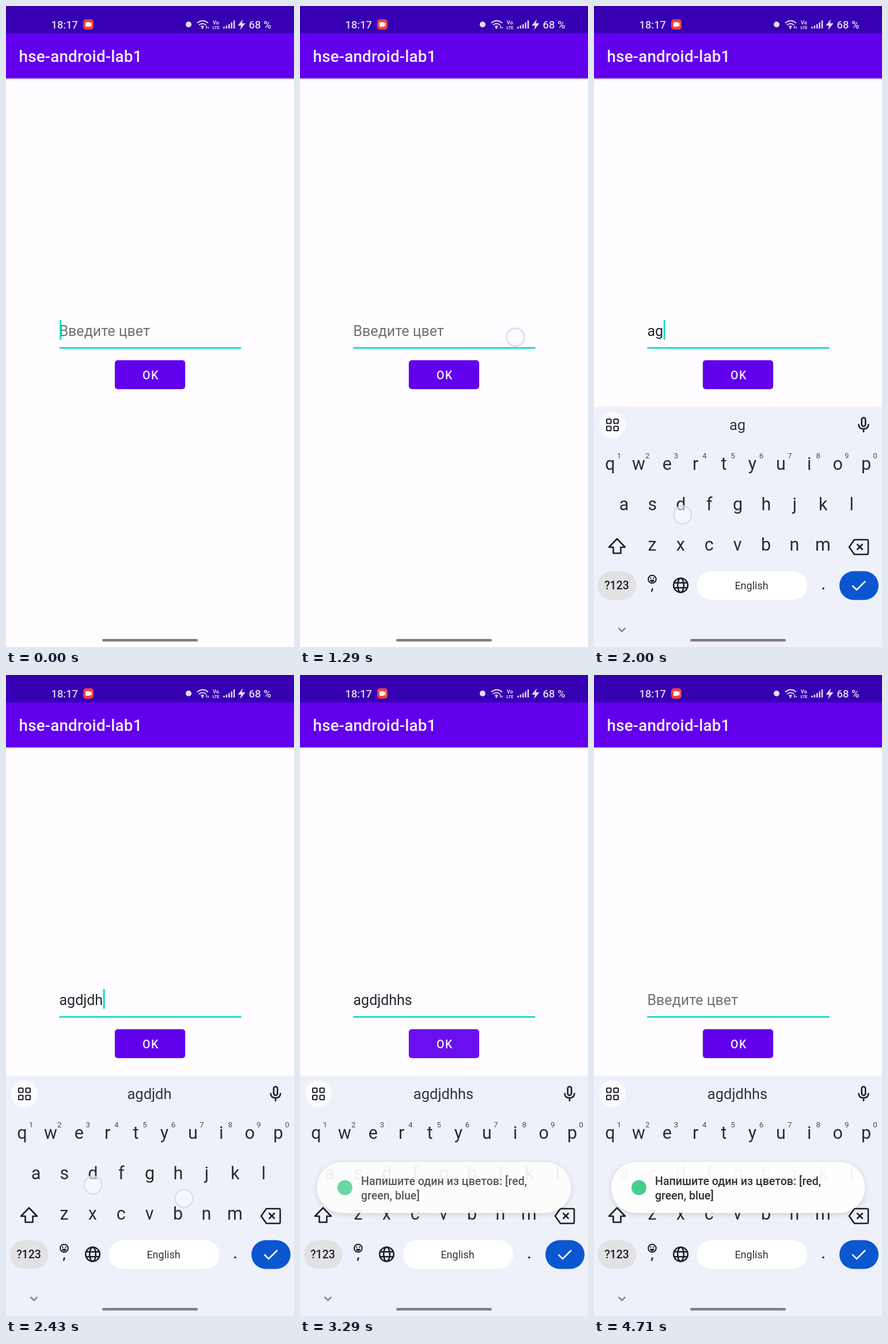
Animation of 500x1111 px, one loop 5.01 s. Source, as an HTML page:

```html
<!DOCTYPE html>
<html lang="ru">
<head>
<meta charset="utf-8">
<title>hse-android-lab1</title>
<style>
  html, body { margin: 0; width: 100%; height: 100%; overflow: hidden; background: #fffdff; }
  svg { display: block; width: 100%; height: 100%; font-family: Roboto, sans-serif; }
  .medium { font-weight: 500; }
  .mid { text-anchor: middle; }
  .line { fill: none; stroke: #1d1f24; stroke-width: 2.6; }
  .thin { stroke-width: 2.1; }
  .status { fill: #e3dbf5; }
  #toast { filter: drop-shadow(0 2px 5px #00000026); }
  #button { filter: drop-shadow(0 .5px 1px #00000030); }
  #touches circle { fill: #f8f8ff; fill-opacity: .6; stroke: #d8d6e8; stroke-width: 2; }
</style>
</head>
<body>
<svg viewBox="0 0 500 1111">
  <defs>
    <linearGradient id="shade" x2="0" y2="1">
      <stop stop-color="#000" stop-opacity=".14"/>
      <stop offset="1" stop-color="#000" stop-opacity="0"/>
    </linearGradient>
  </defs>

  <rect width="500" height="1111" fill="#fffdff"/>
  <rect y="125" width="500" height="4" fill="url(#shade)"/>
  <rect width="500" height="125.5" fill="#6200ee"/>
  <rect width="500" height="47.5" fill="#3700b3"/>
  <text class="medium" x="22.500" y="97" font-size="27.800" letter-spacing=".21" fill="#f6f0ff">hse-android-lab1</text>

  <!-- status bar -->
  <g class="status">
    <text class="medium" x="78.500" y="39" font-size="18.300">18:17</text>
    <rect x="134" y="23" width="18" height="18" rx="5" fill="#f0403f"/>
    <path d="M139.500 28h5q1.500 0 1.500 1.500l2.500-1v7l-2.500-1q0 1.500-1.500 1.500h-5q-1.500 0-1.500-1.500v-5q0-1.500 1.500-1.500z" fill="#fff"/>
    <circle cx="317" cy="32" r="5"/>
    <path d="M332 29.500q9.500-8 19 0M335 33q6-5 12.500 0M338.500 36q2.500-2 5 0" fill="none" stroke="#e3dbf5" stroke-width="2"/>
    <circle cx="341" cy="38" r="1.700"/>
    <path d="M348 34v5M351 36v3" stroke="#e3dbf5" stroke-width="1.500"/>
    <g class="mid" font-weight="700">
      <text x="364.500" y="31.500" font-size="9">Vo</text>
      <text x="364.500" y="39.500" font-size="7.500">LTE</text>
    </g>
    <path id="bars" stroke="#e3dbf5" stroke-width="2.500"/>
    <path d="M411 23l-8.500 11h5.500l-1.500 7.500 9-11.500h-5.800z"/>
    <text class="medium" x="421.500" y="39" font-size="18.400">68 %</text>
  </g>

  <!-- form -->
  <text id="field" x="92.500" y="572" font-size="25"></text>
  <rect id="cursor" y="544" width="2.700" height="34.500" fill="#03dac5"/>
  <rect x="92.500" y="591.200" width="316" height="2.800" fill="#16dbc8"/>
  <g id="button">
    <rect id="face" x="189" y="614" width="122" height="50" rx="5"/>
  </g>
  <text class="medium mid" x="251.500" y="646.500" font-size="19.500" letter-spacing="1.700" fill="#f6f0ff">OK</text>

  <g id="keyboard" fill="#1d1f24">
    <rect y="694.500" width="500" height="440" fill="#eff1fa"/>
    <circle cx="32" cy="726" r="23" fill="#fbfcff"/>
    <g id="grid" class="line thin"></g>

    <g id="tools">
      <path class="line" d="M110 714.500h19q2.500 0 2.500 2.500v13l-8 8h-13.500q-2.500 0-2.500-2.500v-18.500q0-2.500 2.500-2.500zM131 730h-5q-2.500 0-2.500 2.500v5M113.500 726q4.500 6 10 1"/>
      <circle cx="115" cy="721.500" r="1.800"/><circle cx="124" cy="721.500" r="1.800"/>
      <text class="mid" x="207" y="733" font-size="18.500" font-weight="900" letter-spacing="1.200">GIF</text>
      <g fill="none" stroke="#2b2d33" transform="translate(293.500 726)">
        <circle r="6.300" stroke-width="5"/>
        <circle r="9.600" stroke-width="4" stroke-dasharray="5.500 4.553"/>
      </g>
      <path d="M380.500 714.500a11.500 11.500 0 1 0 0 23q2.500-.5 2-3.500q-1.500-4 2-4.500h4q3.500-.5 3.500-4.500a11.500 10.500 0 0 0-11.500-10.500z"/>
      <g fill="#eff1fa">
        <circle cx="373.500" cy="726" r="1.900"/><circle cx="377" cy="720" r="1.900"/>
        <circle cx="384" cy="720" r="1.900"/><circle cx="388" cy="725" r="1.900"/>
      </g>
    </g>
    <text id="suggestion" class="mid" x="249" y="735" font-size="25.500" fill="#33353b"></text>

    <rect x="464.700" y="713.500" width="6.600" height="15" rx="3.300" class="line"/>
    <path class="line" d="M459.500 724.500q0 8.500 8.500 8.500t8.500-8.500M468 733v6"/>

    <g id="letters" class="mid" fill="#2a2c32"></g>

    <path class="line" stroke-linejoin="round" d="M40 923.500l14 14.500h-7.500v10.500h-13v-10.500h-7.500z"/>
    <path class="line" stroke-linejoin="round" d="M452 925h22q2 0 2 2v21.500q0 2-2 2h-22l-9-12.800zM456.500 932.500l10 10M466.500 932.500l-10 10"/>

    <rect x="6.500" y="979.500" width="67" height="50" rx="25" fill="#e2e2e5"/>
    <text class="medium mid" x="39.500" y="1011" font-size="19.500">?123</text>
    <g transform="translate(101 993.500)">
      <circle r="6.800" class="line thin"/>
      <circle cx="-2.500" cy="-2" r="1.200"/><circle cx="2.500" cy="-2" r="1.200"/>
      <path d="M-4 1h8q-1 4-4 4t-4-4z"/>
    </g>
    <path d="M100 1009.500h3l-2 6h-2z"/>
    <g class="line" transform="translate(150.500 1004)">
      <circle r="12.300"/><ellipse rx="5.300" ry="12.300"/>
      <path d="M-11.500-4.300h23M-11.500 4.300h23"/>
    </g>
    <rect x="178.500" y="979.500" width="192" height="50" rx="25" fill="#fff"/>
    <text class="mid" x="273.500" y="1010.500" font-size="18" fill="#303238">English</text>
    <circle cx="398" cy="1009.500" r="1.800"/>
    <rect x="426" y="979.500" width="68" height="50" rx="25" fill="#0b57d0"/>
    <path d="M448.500 1004.500l7.500 7.500 15-15" fill="none" stroke="#fff" stroke-width="2.600"/>
    <path d="M42.500 1078l6 6 6-6" fill="none" stroke="#73757c" stroke-width="2.200"/>

    <g id="popup">
      <circle cx="348" cy="858" r="33.500" fill="#fff"/>
      <text class="mid" x="348" y="875" font-size="32">n</text>
    </g>
  </g>

  <g id="toast">
    <rect id="pill" x="29.500" y="844" width="441" height="88.500" rx="44.200" fill="#fff"/>
    <g id="message">
      <circle cx="78" cy="888.500" r="13" fill="#45cf8d"/>
      <g class="medium" font-size="19.600" fill="#2f3035">
        <text x="106" y="883.500">Напишите один из цветов: [red,</text>
        <text x="106" y="908.500">green, blue]</text>
      </g>
    </g>
  </g>

  <rect x="167" y="1097" width="166" height="4.500" rx="2.200" fill="#7d7d82"/>
  <g id="touches"></g>
</svg>

<script>
const $ = id => document.getElementById(id);
const LOOP = 5010, TICK = 1000 / 7;
const WORD = 'agdjdhhs', HINT = 'Введите цвет';
const NS = 'http://www.w3.org/2000/svg';

function add(parent, tag, attrs, text = '') {
  const el = document.createElementNS(NS, tag);
  for (const name in attrs) el.setAttribute(name, attrs[name]);
  el.textContent = text;
  return parent.appendChild(el);
}

const show = (id, on) => { $(id).style.display = on ? '' : 'none'; };

$('bars').setAttribute('d', [3, 5, 7.5, 10.5, 14]
  .map((h, i) => `M${378.5 + i * 4.4} 39v${-h}`).join(''));

for (const x of [22, 34.5])
  for (const y of [716, 728.5]) add($('grid'), 'rect', { x, y, width: 7.5, height: 7.5, rx: 1.5 });

// letter keys: row text, first key centre, baseline
const keyAt = {};
[['qwertyuiop', 28, 804], ['asdfghjkl', 52, 874], ['zxcvbnm', 101, 944]].forEach(([row, x0, y], r) => {
  [...row].forEach((letter, i) => {
    const x = x0 + 49.4 * i;
    keyAt[letter] = [x + 3, y + 8];
    add($('letters'), 'text', { x, y, 'font-size': 30.5 }, letter);
    if (!r) add($('letters'), 'text', { x: x + 15.5, y: 784, 'font-size': 13.5, fill: '#4b4d54' }, (i + 1) % 10);
  });
});

// tick -> number of letters typed
const typing = [[13, 1], [14, 2], [15, 3], [16, 4], [17, 6], [18, 7], [19, 8]];

// tick -> fingers on the screen
const touches = {
  9: [[374, 574]],
  12: [keyAt.a], 13: [keyAt.g], 14: [keyAt.d], 15: [keyAt.j], 16: [keyAt.d],
  17: [[151, 884], [309, 907]],
  18: [keyAt.s],
  22: [[250, 642]],
  27: [[355, 949]]
};

const cursorSpans = [[0, 5], [13, 23], [26, 30]];

function draw(tick) {
  const count = typing.reduce((n, [at, len]) => tick >= at ? len : n, 0);
  const typed = WORD.slice(0, count);
  const value = tick < 33 ? typed : '';

  const field = $('field');
  field.textContent = value || HINT;
  field.setAttribute('fill', value ? '#25262b' : '#717176');
  $('cursor').setAttribute('x', 93.2 + (value ? field.getComputedTextLength() : 0));
  show('cursor', cursorSpans.some(([from, to]) => tick >= from && tick < to));

  // keyboard slides in and slows down
  const p = Math.min(1, Math.max(0, (tick * TICK - 1320) / 285));
  show('keyboard', p > 0);
  $('keyboard').setAttribute('transform', `translate(0 ${417 * (1 - p) ** 2})`);
  show('tools', !typed);
  $('suggestion').textContent = typed;
  show('popup', tick === 27);

  const pressed = tick === 22 || tick === 23;
  $('face').setAttribute('fill', pressed ? '#6a10ee' : '#6200ee');

  const fading = tick === 23;
  show('toast', tick >= 23);
  $('pill').setAttribute('fill-opacity', fading ? .92 : .95);
  $('message').setAttribute('opacity', fading ? .8 : 1);

  $('touches').replaceChildren();
  for (const [cx, cy] of touches[tick] || []) add($('touches'), 'circle', { cx, cy, r: 15.5 });
}

let last = -1;
const start = performance.now();
function frame() {
  const time = (performance.now() - start) % LOOP;
  const tick = Math.min(33, Math.floor((time + 5) / TICK));
  if (tick !== last) draw(last = tick);
  requestAnimationFrame(frame);
}
frame();
</script>
</body>
</html>
```
